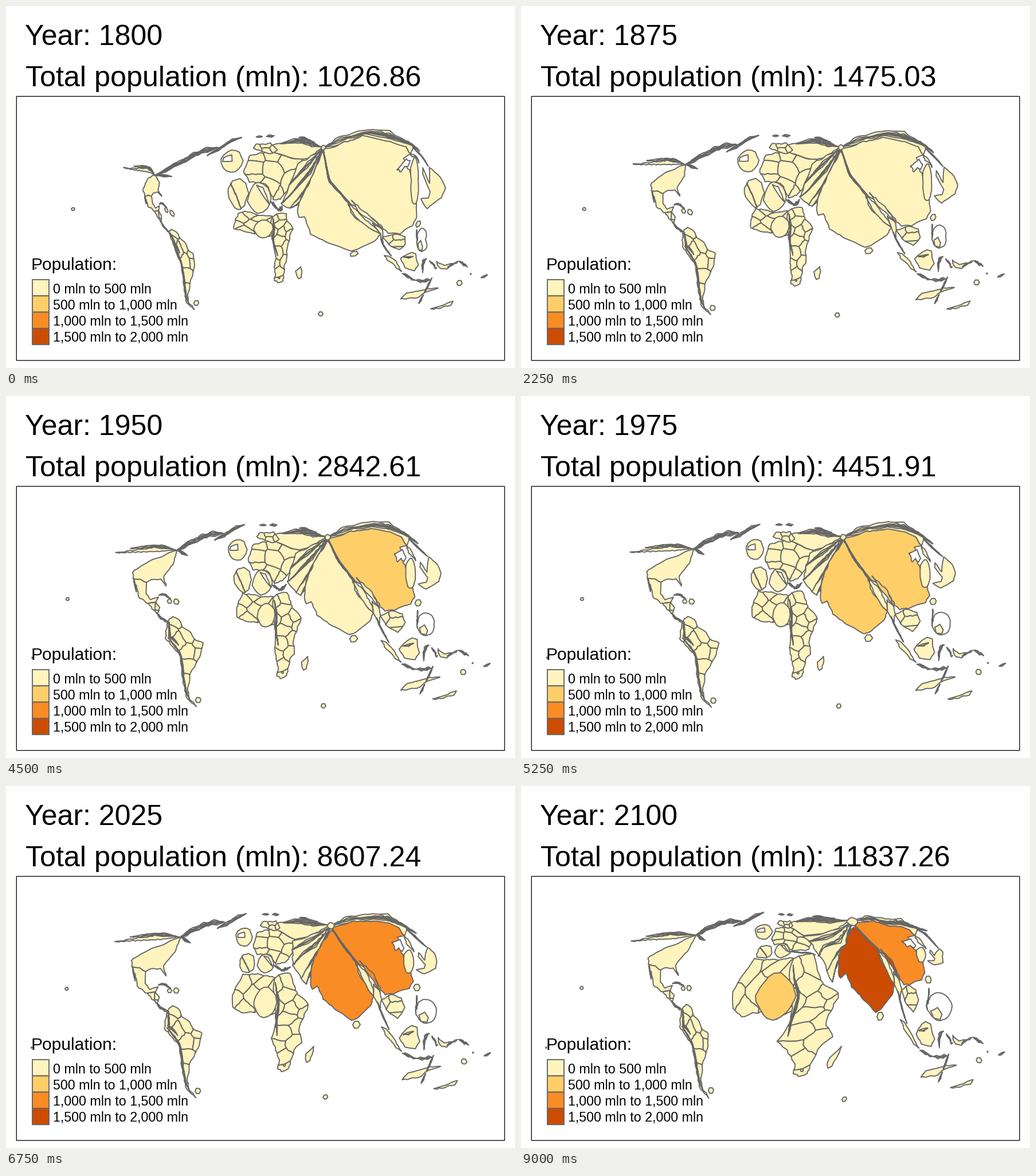
A matplotlib script for the animation above (9750 ms loop, 888x631 px).

```python
import numpy as np
import matplotlib.pyplot as plt
from matplotlib.animation import FuncAnimation
from matplotlib.patches import Polygon, Rectangle
from matplotlib.path import Path

W, H, DPI = 888, 631, 100
PX = 72 / DPI
YEARS = range(1800, 2101, 25)
INTERVAL = 750
TOTALS = [1026.86, 1129.47, 1279.35, 1475.03, 1776.18, 2199.14, 2842.61,
          4451.91, 6589.36, 8607.24, 10353.05, 11348.52, 11837.26]
COLORS = ["#FFF4BD", "#FECE69", "#FA8C25", "#CB4C02"]
LABELS = ["0 mln to 500 mln", "500 mln to 1,000 mln",
          "1,000 mln to 1,500 mln", "1,500 mln to 2,000 mln"]
# years in which a country climbs to the next class
STEPS = {"low": (), "india": (1975, 2000, 2050), "china": (1950, 2000), "nigeria": (2075,)}
GREY = "#666666"

rng = np.random.default_rng(7)
pins, shapes = [], []


# --- moving places, given as they lie in 1800, 2000 and 2100 ---
def pin(lag, *rows):
    pins.extend([lag, *row] for row in rows)


def blob(lag, then, now, later, kind="low", n=15):
    """Round country (cx, cy, rx, ry) that swells or shrinks on its own."""
    keys = np.array([then, now, later], float)
    for dx, dy in ((-1, 0), (1, 0), (0, -1), (0, 1)):
        pin(lag, (keys[:, :2] + keys[:, 2:] * (dx, dy)).ravel())
    disc(now, kind, n)


def isle(lag, r, then, now, later):
    pin(lag, (*then, *now, *later))
    disc((*now, r, r), n=6)


# --- shapes, drawn as they look in 2000 ---
def roughen(p, size):
    """Split long edges and shake them; shared borders stay shared."""
    out = []
    for a, b in zip(p, np.roll(p, -1, axis=0)):
        n = max(1, round(np.hypot(*(b - a)) / 5))
        out += [a + (b - a) * k / n for k in range(n)]
    out = np.array(out)
    x, y = out.T
    return out + size * np.column_stack([np.sin(2.1 * x + 1.3 * y), np.sin(1.7 * x - 2.9 * y)])


def land(*points, kind="low", size=0.8):
    shapes.append((roughen(np.array(points, float), size), kind))


def disc(at, kind="low", n=15):
    cx, cy, rx, ry = at
    a = np.arange(n) * 2 * np.pi / n
    r = rng.uniform(0.93, 1.05, n)
    land(*np.column_stack([cx + rx * r * np.cos(a), cy + ry * r * np.sin(a)]), kind=kind, size=0.3)


def slivers(n, length, spread, *path):
    """Thin leaves scattered along a path."""
    p = np.array(path, float)
    s = np.r_[0, np.cumsum(np.hypot(*np.diff(p, axis=0).T))]
    at = lambda d: np.array([np.interp(d, s, p[:, 0]), np.interp(d, s, p[:, 1])])
    for d in rng.uniform(0, max(s[-1] - length, 0), n):
        mid = at(d + length / 2) + rng.uniform(-spread, spread, 2) * (0.4, 1)
        land(at(d), mid - (0.4, 1.3), at(d + length), mid + (0.4, 1.3), size=0.4)


def cut(p, seed, other):
    """Part of a polygon that is nearer to seed than to other."""
    side = (p - (seed + other) / 2) @ (other - seed)
    out = []
    for a, b, sa, sb in zip(p, np.roll(p, -1, axis=0), side, np.roll(side, -1)):
        if sa <= 0:
            out.append(a)
        if sa * sb < 0:
            out.append(a + (b - a) * sa / (sa - sb))
    return np.array(out)


def cells(n, *outline):
    """Split a region into n countries around spread-out random seeds."""
    p = np.array(outline, float)
    cloud = rng.uniform(p.min(0), p.max(0), (600, 2))
    cloud = cloud[Path(p).contains_points(cloud)]
    seeds = [cloud[0]]
    while len(seeds) < n:
        gaps = np.min([np.hypot(*(cloud - s).T) for s in seeds], axis=0)
        seeds.append(cloud[np.argmax(gaps * rng.uniform(0.6, 1, len(gaps)))])
    for i, seed in enumerate(seeds):
        part = p
        for other in seeds[:i] + seeds[i + 1:]:
            part = cut(part, seed, other)
        land(*part)


# --- Americas ---
pin(0.5, (206, 282, 190, 272, 193, 271), (260, 295, 304, 264, 306, 259),
    (306, 272, 328, 251, 328, 247), (375, 245, 384, 237, 388, 235), (412, 229, 418, 223, 424, 220),
    (242, 329, 218, 312, 222, 306), (272, 332, 281, 332, 275, 331), (266, 314, 284, 303, 275, 303),
    (253, 354, 235, 358, 237, 355))
pin(0.5, (286, 392, 288, 386, 286, 383), (326, 433, 346, 431, 326, 432), (329, 529, 333, 543, 328, 544),
    (291, 412, 276, 424, 277, 420), (316, 485, 314, 486, 311, 486))
land((190, 272), (225, 266), (260, 261), (303, 264), (270, 268), (225, 270))
slivers(9, 34, 4, (216, 264), (250, 258), (303, 264))
slivers(30, 26, 4, (304, 264), (328, 251), (345, 243), (365, 238), (385, 237))
slivers(4, 17, 3, (304, 264), (322, 275))
slivers(6, 34, 4, (360, 254), (386, 238), (419, 223))
land((304, 265), (296, 290), (276, 314), (281, 332), (270, 319), (254, 319), (244, 324), (232, 318),
     (219, 316), (218, 305), (239, 291), (285, 272))
land((219, 316), (232, 318), (244, 324), (243, 345), (251, 356), (266, 351), (261, 361), (243, 361), (229, 350), (226, 334))
slivers(3, 22, 2, (220, 318), (225, 341))
cells(3, (246, 362), (260, 360), (267, 368), (264, 380), (254, 372))
slivers(6, 14, 2, (258, 374), (267, 387), (284, 393))
slivers(4, 14, 2, (263, 349), (274, 345), (290, 355))
isle(0.5, 5, (290, 362), (298, 358), (293, 352))
isle(0.5, 4, (279, 354), (286, 358), (283, 352))
cells(10, (282, 392), (292, 383), (306, 393), (309, 403), (324, 412), (330, 424), (347, 430), (339, 456),
      (330, 472), (322, 482), (317, 515), (321, 530), (333, 543), (316, 530), (307, 490), (304, 452),
      (276, 424), (278, 410))
slivers(14, 30, 3, (279, 420), (305, 450), (310, 490), (314, 520), (328, 540))
slivers(8, 16, 4, (284, 392), (284, 420), (306, 440))
isle(0.5, 5, (332, 517), (336, 532), (332, 530))
isle(0.5, 3, (117, 354), (106, 354), (106, 352))
isle(0.5, 1, (52, 457), (45, 456), (44, 456))

# --- Russia ---
land((462, 247), (480, 238), (515, 237), (562, 245), (535, 261), (507, 270), (484, 258))
slivers(14, 42, 4, (478, 240), (515, 237), (562, 245))
slivers(3, 20, 2, (498, 227), (520, 232), (545, 239))
slivers(5, 9, 1, (440, 224), (484, 224))
land((562, 247), (590, 229), (640, 219), (668, 221), (719, 258), (703, 250), (697, 262), (688, 246),
     (640, 233), (605, 236))
slivers(14, 48, 4, (563, 246), (605, 230), (640, 226), (670, 228), (697, 243), (719, 258))
slivers(5, 24, 2, (700, 248), (722, 270), (737, 281))

# --- Europe ---
pin(2.2, (414, 290, 429, 284, 437, 266), (440, 257, 448, 254, 452, 247), (517, 267, 507, 270, 492, 261),
    (480, 320, 478, 305, 480, 277), (490, 322, 497, 295, 505, 273), (447, 245, 462, 240, 462, 240))
cells(9, (429, 284), (436, 258), (448, 254), (470, 250), (507, 270), (497, 295), (484, 315), (470, 318),
      (460, 300), (437, 299))
cells(4, (443, 245), (446, 237), (472, 236), (480, 248), (470, 254), (452, 248))
blob(2.2, (394, 270, 20, 20), (413, 266, 14, 17), (424, 254, 15, 13))
land((402, 267), (402, 261), (413, 257), (414, 267), kind="sea", size=0.2)
blob(2.2, (405, 327, 20, 28), (419, 315, 14, 19), (425, 289, 13, 11), n=9)
slivers(1, 34, 1, (409, 301), (424, 333))
blob(2.2, (441, 335, 22, 27), (452, 317, 15, 17), (456, 287, 13, 12))
land((449, 303), (457, 305), (465, 324), (456, 312), kind="sea", size=0.3)
slivers(12, 9, 4, (466, 320), (480, 332), (492, 322))

# --- Fan of countries between the knot and the gulf ---
pin(0.8, (480, 345, 494, 318, 520, 297), (499, 350, 517, 346, 542, 345))
KNOT = (563, 248)
rim = [(503, 274), (499, 290), (494, 318), (508, 340), (517, 346), (522, 338), (528, 313)]
for a, b in zip(rim, rim[1:]):
    land(KNOT, a, b)
for tip in rim[1:]:
    slivers(2, 60, 4, KNOT, tip)

# --- Africa ---
pin(0.8, (399, 377, 403, 366, 369, 358), (406, 362, 416, 337, 408, 300), (464, 367, 465, 346, 473, 300),
    (490, 362, 491, 337, 511, 291), (497, 392, 516, 395, 553, 368), (488, 445, 506, 450, 544, 435),
    (475, 482, 480, 495, 485, 506), (471, 440, 468, 438, 446, 445), (410, 391, 418, 393, 385, 404),
    (507, 466, 519, 468, 535, 482), (515, 456, 530, 455, 559, 456))
cells(9, (403, 366), (416, 337), (440, 336), (470, 346), (470, 396), (455, 402), (442, 394), (418, 393), (405, 384))
cells(14, (466, 346), (478, 338), (491, 337), (501, 366), (518, 386), (516, 395), (504, 425), (506, 450),
      (498, 460), (491, 490), (480, 495), (474, 490), (476, 475), (468, 438), (472, 410), (468, 390))
slivers(9, 38, 3, (468, 350), (474, 385), (471, 410), (476, 440))
blob(0.8, (449, 388, 17, 16), (455, 380, 15, 22), (444, 366, 36, 42), "nigeria")
isle(0.8, 2, (476, 474), (484, 484), (490, 496))
land((519, 474), (519, 465), (530, 453), (530, 461), (526, 475), (521, 478))

# --- India and China ---
pin(0.75, (552, 251, 564, 252, 582, 246), (509, 350, 523, 345, 554, 310), (535, 295, 540, 285, 568, 276),
    (532, 398, 546, 378, 577, 350), (603, 428, 598, 414, 619, 396), (654, 398, 637, 374, 651, 347),
    (597, 343, 606, 314, 622, 285), (563, 305, 583, 283, 604, 268))
pin(0.75, (620, 226, 640, 233, 645, 245), (699, 246, 688, 246, 678, 251), (682, 286, 676, 273, 664, 271),
    (716, 368, 712, 345, 704, 325), (688, 397, 675, 367, 678, 346), (622, 358, 637, 333, 646, 303),
    (722, 253, 719, 258, 709, 252), (640, 215, 640, 219, 640, 231))
land((564, 252), (583, 283), (606, 314), (612, 336), (637, 374), (633, 388), (607, 411), (598, 414),
     (570, 397), (546, 378), (535, 356), (526, 360), (523, 345), (528, 313), (540, 285), kind="india")
land((564, 249), (605, 236), (640, 233), (670, 236), (688, 246), (697, 262), (686, 264), (688, 273),
     (676, 273), (688, 284), (707, 328), (712, 345), (706, 357), (675, 367), (660, 369), (652, 362),
     (637, 333), (606, 314), (583, 283), kind="china")
land((613, 312), (626, 322), (640, 336), (650, 366), (637, 345), kind="india")
land((606, 314), (626, 332), (637, 360), (637, 374), (620, 348))
slivers(6, 62, 2, KNOT, (583, 282), (610, 316))
land((637, 374), (638, 352), (650, 366), (652, 378), (650, 392))
blob(0.75, (554, 247, 4, 4), (563, 246, 5, 5), (578, 236, 10, 7))
isle(0.75, 7, (605, 431), (606, 421), (627, 400))

# --- Korea, Japan, Philippines ---
pin(0.75, (767, 317, 757, 307, 735, 298), (735, 354, 733, 333, 722, 312), (738, 281, 737, 280, 730, 284))
land((677, 273), (690, 268), (697, 284), (692, 290), (687, 283), (682, 290), kind="sea")
land((697, 262), (704, 268), (714, 291), (701, 277))
blob(0.75, (713, 304, 6, 42), (704, 310, 9, 23), (698, 294, 8, 13))
land((737, 280), (752, 293), (757, 307), (754, 321), (733, 333), (718, 326), (732, 322), (735, 315),
     (721, 300), (722, 292), (733, 306), size=0.4)
isle(0.75, 6, (719, 382), (719, 356), (710, 338))
blob(0.75, (725, 407, 7, 21), (734, 395, 17, 20), (730, 384, 23, 25), "sea", 24)
land((722, 402), (732, 397), (738, 406), (735, 413), (725, 412), size=0.4)
slivers(7, 9, 2, (719, 368), (718, 385), (717, 402))

# --- South-east Asia and Oceania ---
pin(0.75, (697, 415, 697, 390, 694, 373), (656, 402, 652, 378, 664, 355), (660, 435, 653, 424, 662, 407),
    (689, 440, 686, 442, 690, 433), (727, 484, 730, 480, 732, 477), (688, 511, 688, 514, 697, 508),
    (782, 448, 778, 447, 777, 442), (835, 470, 841, 467, 839, 465))
cells(4, (652, 378), (670, 369), (690, 374), (697, 390), (683, 409), (664, 398))
slivers(7, 26, 2, (643, 378), (654, 404), (668, 430))
land((653, 424), (662, 427), (678, 446), (689, 465), (679, 459), (660, 436))
land((686, 442), (691, 433), (708, 419), (717, 423), (721, 446), (713, 459), (694, 456))
slivers(3, 20, 2, (690, 436), (716, 428))
slivers(12, 13, 2, (686, 466), (715, 476), (745, 474))
slivers(7, 18, 4, (740, 431), (730, 442), (729, 462))
slivers(7, 8, 4, (743, 436), (755, 456))
land((754, 440), (764, 449), (778, 447), (768, 457), (756, 452))
slivers(8, 10, 2, (764, 456), (790, 442), (808, 453))
land((688, 514), (700, 501), (735, 491), (758, 489), (735, 497), (722, 508))
slivers(3, 24, 2, (732, 500), (746, 470))
slivers(2, 18, 1, (722, 521), (731, 502))
land((746, 529), (772, 519), (788, 514), (782, 521), (760, 527))
isle(0.75, 5, (790, 483), (799, 481), (799, 478))
isle(0.75, 1, (811, 467), (815, 465), (814, 463))
slivers(2, 12, 1, (834, 471), (847, 465))
isle(0.75, 4, (549, 537), (555, 541), (564, 546))

# --- warp: smooth interpolation of the moving places ---
lag, keys = np.split(np.array([np.hstack(p) for p in pins], float), [1], axis=1)
then, now, later = keys.reshape(-1, 3, 2).transpose(1, 0, 2)


def shift(year):
    grow = min((year - 1800) / 200, 1) ** lag
    return (then - now) * (1 - grow) + (later - now) * max(year - 2000, 0) / 100


def kernel(p):
    r = np.hypot(*(p[:, None] - now[None]).transpose(2, 0, 1))
    return np.hstack([r, np.ones((len(p), 1))])


n = len(now)
system = np.zeros((n + 1, n + 1))
system[:n] = kernel(now)
system[n, :n] = 1
weights = [np.linalg.solve(system, np.vstack([shift(y), np.zeros((1, 2))])) for y in YEARS]

# --- stage ---
plt.rcParams["font.family"] = "Liberation Sans"
fig = plt.figure(figsize=((W + 0.01) / DPI, (H + 0.01) / DPI), dpi=DPI, facecolor="white")
ax = fig.add_axes([0, 0, 1, 1])
ax.set_xlim(0, W)
ax.set_ylim(H, 0)
ax.axis("off")


def label(x, y, s, px):
    return ax.text(x, y, s, fontsize=px * PX, color="black", va="baseline", zorder=5)


ax.add_patch(Rectangle((18.3, 157.5), 851.5, 460.3, fill=False, ec="black", lw=1.3 * PX, snap=False))
year_text = label(33, 67.5, "", 50)
total_text = label(33.5, 140, "", 50.3)
label(43, 459.5, "Population:", 30)
for i, (color, name) in enumerate(zip(COLORS, LABELS)):
    y = 477 + 28.3 * i
    ax.add_patch(Rectangle((46, y), 29, 28.3, fc=color, ec=GREY, lw=1.9 * PX, zorder=4, snap=False))
    label(82, y + 23.5, name, 23.2)

patches = []
for outline, kind in shapes:
    patch = Polygon(outline, fc="white", ec=GREY, lw=1.9 * PX, joinstyle="round", zorder=2)
    patches.append((ax.add_patch(patch), outline, kernel(outline), kind))


def update(i):
    year = YEARS[i]
    year_text.set_text(f"Year: {year}")
    total_text.set_text(f"Total population (mln): {TOTALS[i]:.2f}")
    for patch, outline, near, kind in patches:
        patch.set_xy(outline + near @ weights[i])
        if kind in STEPS:
            patch.set_facecolor(COLORS[sum(year >= step for step in STEPS[kind])])
    return []


anim = FuncAnimation(fig, update, frames=len(YEARS), interval=INTERVAL, repeat=True, repeat_delay=0)
plt.show()
```
